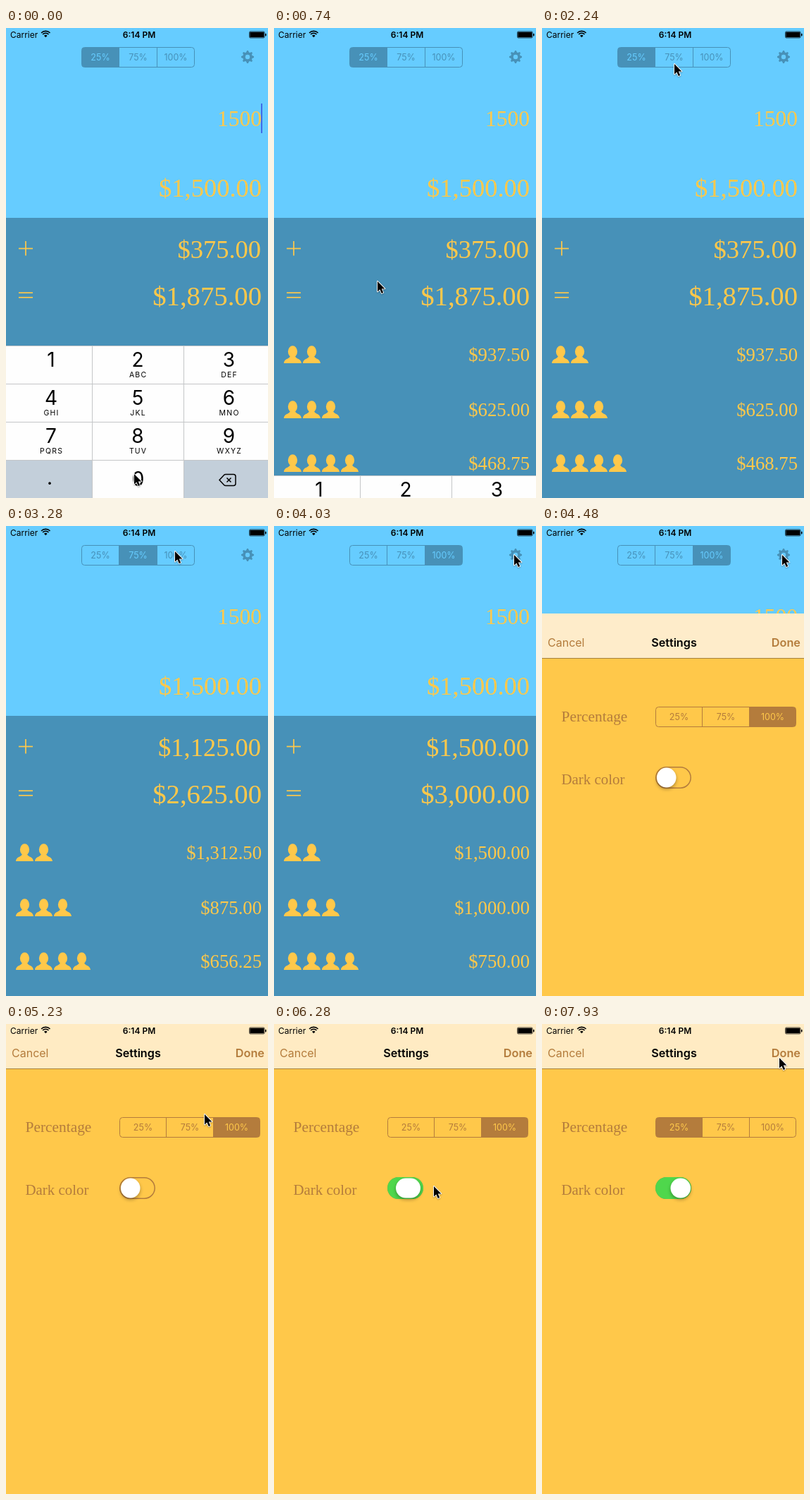
Animation of 372x666 px, one loop 8 s. Source, as an HTML page with a canvas:

```html
<!DOCTYPE html>
<html lang="en">
<head>
<meta charset="utf-8">
<title>Tip calculator</title>
<style>
html, body { margin: 0; width: 100%; height: 100%; overflow: hidden; background: #66ccff; }
canvas { display: block; width: 372px; height: 666px; }
</style>
</head>
<body>
<canvas id="stage"></canvas>
<script>
const W = 372, H = 666, LOOP = 8000;
const SKY = '#66ccff', STEEL = '#4791b8', GOLD = '#ffc84a', BROWN = '#b47c3c';
const SANS = 'Inter, "Open Sans", sans-serif';
const SERIF = '"Liberation Serif", "Noto Serif", serif';
const RATES = [25, 75, 100];

const canvas = document.getElementById('stage');
const dpr = window.devicePixelRatio || 1;
canvas.width = W * dpr;
canvas.height = H * dpr;
const c = canvas.getContext('2d');

// Each key: [time, ...values]
const POINTER = [
  [0, 182, 632], [560, 147, 359], [1040, 147, 359], [1490, 188, 60],
  [2090, 188, 60], [2390, 188, 42], [2840, 188, 42], [3280, 240, 36],
  [3430, 240, 36], [3880, 320, 41], [4030, 341, 41], [4630, 341, 41],
  [5230, 282, 128], [5680, 184, 231], [5830, 184, 231], [6280, 227, 230],
  [6580, 232, 229], [6730, 232, 229], [7180, 195, 146], [7330, 195, 146],
  [7780, 316, 58], [7930, 337, 48]
];
// Left and right edge of the switch knob
const KNOB = [
  [5680, 163, 190.5], [5830, 163, 197.5], [5980, 163, 198], [6280, 173, 208],
  [6430, 180, 210.5], [6580, 182.5, 211]
];

const clamp = v => Math.max(0, Math.min(1, v));
const mix = (a, b, k) => a + (b - a) * k;
const smooth = k => k * k * (3 - 2 * k);
const settle = (t, start, tau) => t < start ? 0 : 1 - Math.exp((start - t) / tau);

function track(keys, t) {
  let i = keys.findIndex(k => k[0] > t);
  if (i < 0) return keys[keys.length - 1].slice(1);
  if (i === 0) return keys[0].slice(1);
  const a = keys[i - 1], b = keys[i];
  const k = smooth((t - a[0]) / (b[0] - a[0]));
  return a.slice(1).map((v, n) => mix(v, b[n + 1], k));
}

function step(t) {
  const base = t < 2980 ? 140 : 2980;
  return t < 140 ? 0 : base + Math.floor((t - base) / 150) * 150;
}

function box(x, y, w, h, color) {
  c.fillStyle = color;
  c.fillRect(x, y, w, h);
}

function text(str, x, y, size, color, { align = 'left', weight = 400, font = SANS, space = 0 } = {}) {
  c.font = `${weight} ${size}px ${font}`;
  c.textAlign = align;
  c.fillStyle = color;
  c.letterSpacing = space + 'px';
  c.fillText(str, x, y);
  c.letterSpacing = '0px';
}

function round(x, y, w, h, r) {
  c.beginPath();
  c.roundRect(x, y, w, h, r);
}

function line(points, color, width) {
  c.beginPath();
  points.forEach(([x, y], i) => i ? c.lineTo(x, y) : c.moveTo(x, y));
  c.strokeStyle = color;
  c.lineWidth = width;
  c.stroke();
}

function money(value, right, base, size) {
  const str = '$' + value.toLocaleString('en-US', { minimumFractionDigits: 2, maximumFractionDigits: 2 });
  text(str, right, base, size, GOLD, { align: 'right', font: SERIF });
}

function segments(edges, y, selected, color, back) {
  const x = edges[0], w = edges[3] - x;
  c.save();
  round(x, y, w, 28, 4);
  c.clip();
  box(edges[selected], y, edges[selected + 1] - edges[selected], 28, color);
  c.restore();
  round(x, y, w, 28, 4);
  c.strokeStyle = color;
  c.lineWidth = 1;
  c.stroke();
  for (const e of [edges[1], edges[2]]) line([[e, y], [e, y + 28]], color, 1);
  RATES.forEach((r, i) => text(r + '%', (edges[i] + edges[i + 1]) / 2, y + 18.6, 12.5,
    i === selected ? back : color, { align: 'center' }));
}

function gear(x, y) {
  c.fillStyle = STEEL;
  c.beginPath();
  for (let i = 0; i < 32; i++) {
    const a = (i - 0.5) * Math.PI / 16, r = i % 4 < 2 ? 9 : 6.8;
    c.lineTo(x + r * Math.cos(a), y + r * Math.sin(a));
  }
  c.closePath();
  c.moveTo(x + 3.2, y);
  c.arc(x, y, 3.2, 0, Math.PI * 2, true);
  c.fill('evenodd');
}

function person(x, y) {
  c.fillStyle = GOLD;
  c.beginPath();
  c.ellipse(x + 12.5, y + 8.5, 6.6, 8.3, 0, 0, Math.PI * 2);
  c.fill();
  c.beginPath();
  c.moveTo(x + 9, y + 13);
  c.bezierCurveTo(x + 9.5, y + 20, x + 1, y + 17, x, y + 25);
  c.lineTo(x + 25, y + 25);
  c.bezierCurveTo(x + 24, y + 17, x + 15.5, y + 20, x + 16, y + 13);
  c.fill();
}

function calculator(selected, caret) {
  box(0, 0, W, 269, SKY);
  box(0, 269, W, H - 269, STEEL);
  segments([107.5, 160.5, 214.5, 267.5], 27.5, selected, STEEL, SKY);
  gear(343, 41);

  const bill = 1500, tip = bill * RATES[selected] / 100, total = bill + tip;
  text('1500', 363, 139, 31.5, GOLD, { align: 'right', font: SERIF });
  if (caret) box(362, 107, 2, 42, '#3f6be8');
  money(bill, 363, 239, 36.5);
  money(tip, 362, 326, 36.5);
  money(total, 363, 393, 38.7);

  line([[18, 312.5], [38, 312.5]], GOLD, 1.7);
  line([[28, 302], [28, 322.5]], GOLD, 1.7);
  line([[18, 375.2], [38, 375.2]], GOLD, 1.7);
  line([[18, 381.8], [38, 381.8]], GOLD, 1.7);

  [450, 528, 604].forEach((y, row) => {
    for (let i = 0; i < row + 2; i++) person(14 + i * 27, y);
    money(total / (row + 2), 363, y + 21.5, 26.7);
  });
}

function keypad(top) {
  if (top >= H) return;
  const cols = [0, 122, 252, W], mids = [64, 187, 316.5];
  const letters = ['', 'ABC', 'DEF', 'GHI', 'JKL', 'MNO', 'PQRS', 'TUV', 'WXYZ'];
  c.save();
  c.translate(0, top);
  box(0, 0, W, 216, '#fefefe');
  box(0, 162, 122, 54, '#c3cfda');
  box(252, 162, 120, 54, '#c3cfda');
  for (let i = 0; i < 4; i++) box(0, i * 54, W, 1, '#c4c6c8');
  for (const x of [cols[1], cols[2]]) box(x, 0, 1, 216, '#c4c6c8');
  letters.forEach((str, i) => {
    const x = mids[i % 3], y = Math.floor(i / 3) * 54;
    text(i + 1, x, y + 30, 28, '#000', { align: 'center' });
    text(str, x + 0.6, y + 45, 10.5, '#000', { align: 'center', space: 1.2 });
  });
  text('.', 62, 197, 28, '#000', { align: 'center' });
  text('0', 187.5, 199, 28, '#000', { align: 'center' });

  c.beginPath();
  c.moveTo(303, 190.5);
  c.lineTo(309.5, 183.5);
  c.quadraticCurveTo(310.5, 182.5, 312, 182.5);
  c.lineTo(323, 182.5);
  c.quadraticCurveTo(326, 182.5, 326, 185.5);
  c.lineTo(326, 195.5);
  c.quadraticCurveTo(326, 198.5, 323, 198.5);
  c.lineTo(312, 198.5);
  c.quadraticCurveTo(310.5, 198.5, 309.5, 197.5);
  c.closePath();
  c.strokeStyle = '#000';
  c.lineWidth = 1.5;
  c.stroke();
  line([[313.5, 187.5], [319.5, 193.5]], '#000', 1.5);
  line([[319.5, 187.5], [313.5, 193.5]], '#000', 1.5);
  c.restore();
}

function toggle(t) {
  const on = clamp((t - 5980) / 300);
  round(161.8, 217.8, 49.4, 29.4, 14.7);
  c.strokeStyle = BROWN;
  c.lineWidth = 1.5;
  c.stroke();
  c.globalAlpha = on;
  round(161, 217, 51, 31, 15.5);
  c.fillStyle = '#4fd74c';
  c.fill();
  c.globalAlpha = 1;

  const [left, right] = track(KNOB, t);
  c.save();
  c.shadowColor = 'rgba(0,0,0,.32)';
  c.shadowBlur = 5 * dpr;
  c.shadowOffsetY = 2.5 * dpr;
  round(left, 218.6, right - left, 28, 14);
  c.fillStyle = '#fff';
  c.fill();
  c.restore();
}

function settings(shown, selected, t) {
  if (shown <= 0) return;
  const k = clamp((shown - 0.27) / 0.73);
  c.save();
  c.translate(0, Math.round(H * (1 - shown)));
  box(0, 0, W, H, GOLD);
  box(0, 0, W, 64, `rgb(${mix(252, 255, k)},${mix(240, 235, k)},${mix(221, 195, k)})`);
  box(0, 63, W, 1, '#a5823f');
  text('Cancel', 8, 47, 16, BROWN);
  text('Settings', 187.5, 47, 16.2, '#000', { align: 'center', weight: 600 });
  text('Done', 367, 47, 16.3, BROWN, { align: 'right', weight: 600 });
  text('Percentage', 27.5, 153, 21.4, BROWN, { font: SERIF });
  text('Dark color', 27.5, 242, 20.9, BROWN, { font: SERIF });
  segments([161.5, 227.5, 294.5, 360.5], 132.5, selected, BROWN, GOLD);
  toggle(t);
  c.restore();
}

function statusBar() {
  text('Carrier', 6, 14, 12, '#000');
  text('6:14 PM', 189, 14, 12, '#000', { align: 'center', weight: 600 });
  for (const r of [3.2, 6, 8.8]) {
    c.beginPath();
    c.arc(56.3, 13.2, r, -Math.PI * 0.75, -Math.PI * 0.25);
    if (r < 4) {
      c.lineTo(56.3, 13.2);
      c.fillStyle = '#000';
      c.fill();
    } else {
      c.strokeStyle = '#000';
      c.lineWidth = 1.6;
      c.stroke();
    }
  }
  round(345.5, 5, 21.5, 9, 1.5);
  c.strokeStyle = '#000';
  c.lineWidth = 0.7;
  c.stroke();
  box(346.3, 5.8, 20, 7.4, '#000');
  round(368, 7.8, 1.5, 3.6, 0.8);
  c.fill();
}

function pointer(x, y) {
  const arrow = [[0, 0], [0, 14.5], [3.4, 11.4], [5.8, 17], [8.2, 16], [5.8, 10.6], [10.4, 10.4]];
  c.save();
  c.translate(x, y);
  c.beginPath();
  arrow.forEach(p => c.lineTo(...p));
  c.closePath();
  c.shadowColor = 'rgba(0,0,0,.3)';
  c.shadowBlur = 2 * dpr;
  c.shadowOffsetY = dpr;
  c.strokeStyle = '#fff';
  c.lineWidth = 1.8;
  c.lineJoin = 'round';
  c.stroke();
  c.shadowColor = 'transparent';
  c.fillStyle = '#000';
  c.fill();
  c.restore();
}

function draw(now) {
  const t = step(now % LOOP);
  c.setTransform(dpr, 0, 0, dpr, 0, 0);
  calculator(t < 2690 ? 0 : t < 3430 ? 1 : 2, t < 590);
  keypad(t >= 1040 ? H : Math.round(450 + 216 * settle(t, 540, 105)));
  const shown = t >= 5080 ? 1 : settle(t, 4295, 110);
  settings(shown, t < 7330 ? 2 : 0, t);
  statusBar();
  pointer(...track(POINTER, t));
}

const start = performance.now();
function tick() {
  draw(performance.now() - start);
  requestAnimationFrame(tick);
}
tick();
</script>
</body>
</html>
```
